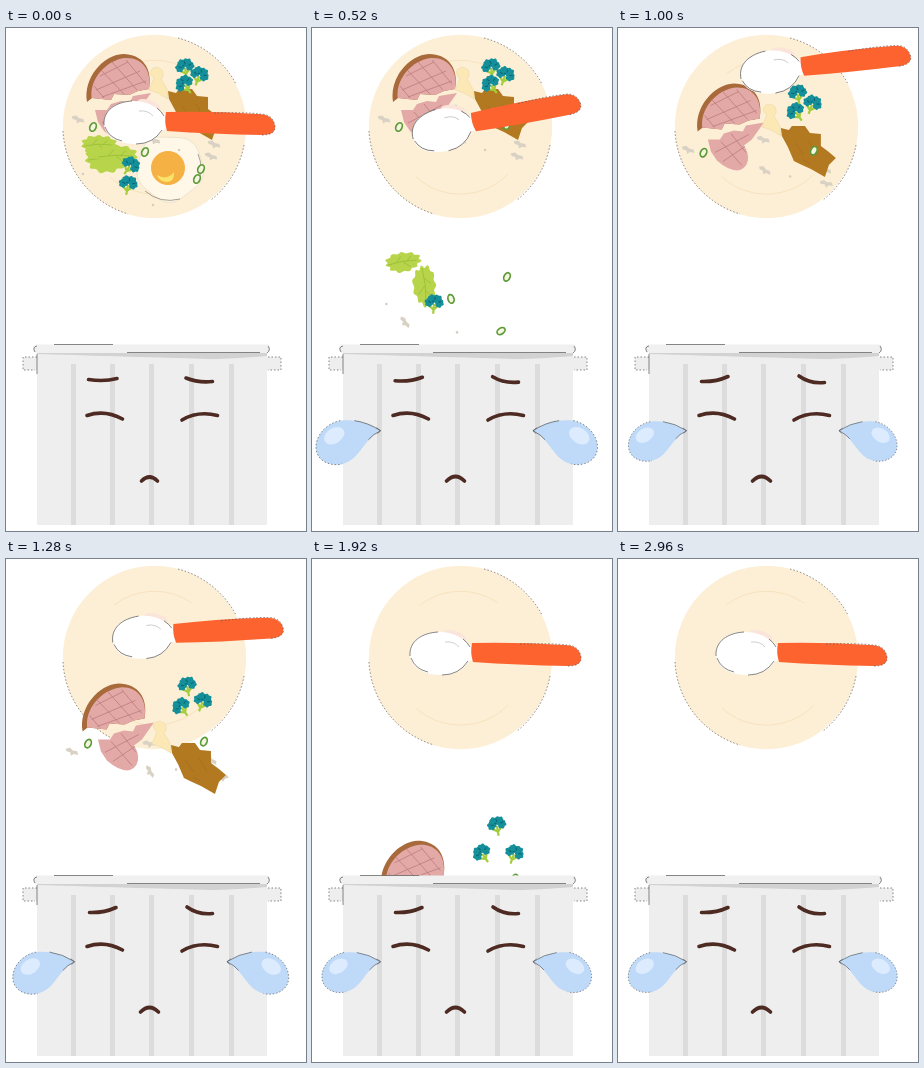
Write an HTML page that moves like this. It is 300x503 px and loops after 3 s.

```html
<!DOCTYPE html>
<html lang="en">
<head>
<meta charset="utf-8">
<title>Sad bin</title>
<style>
html, body { margin: 0; width: 100%; height: 100%; overflow: hidden; background: #fff; }
svg { display: block; width: 300px; height: 503px; }
.ink { fill: none; stroke: #555; stroke-width: .7; }
.dots { stroke-dasharray: 1.5 2; }
.face { fill: none; stroke: #4d2a22; stroke-width: 3.6; stroke-linecap: round; }
</style>
</head>
<body>
<svg viewBox="0 0 300 503">
  <defs>
    <clipPath id="above"><path d="M0 0H300V318H0Z"/></clipPath>
    <g id="tear">
      <path fill="#bedaf8" d="M0 0C-10-7-24-12-40-10C-55-7-65 6-64 18C-63 30-50 36-38 33C-20 29-17 8 0 0Z"/>
      <ellipse cx="-46" cy="5" rx="11" ry="7.5" fill="#dcebfd" transform="rotate(-32 -46 5)"/>
      <path class="ink" d="M-26-10Q-12-8 0 0Q-8 4-12 9M-4-3L0 0L-3 3"/>
      <path class="ink dots" d="M-40-10C-55-7-65 6-64 18C-63 30-50 36-38 33"/>
    </g>
  </defs>

  <circle cx="148.5" cy="98.5" r="91.7" fill="#fdefd6"/>
  <path class="ink dots" d="M57 103A91.7 91.7 0 0 0 122 186M172 10A91.7 91.7 0 0 1 230 56M238 117A91.7 91.7 0 0 1 205 172"/>
  <path fill="none" stroke="#f8e2bd" d="M108 46A66 66 0 0 1 186 44M104 149A66 66 0 0 0 196 146"/>

  <g id="food" clip-path="url(#above)"></g>

  <g id="spoon">
    <ellipse cx="143" cy="77" rx="12" ry="5" fill="#fbe4da" transform="rotate(18 143 77)"/>
    <path fill="#fff" d="M98 95C98 80 112 73 127 73C143 73 151 80 158 86L161 87V101L157 102C151 110 144 116 130 116C113 116 98 109 98 95Z"/>
    <path class="ink" d="M98 97C97 82 110 74 126 73M99 99Q103 110 116 113M130 116Q147 116 156 102M151 80Q156 84 158 88"/>
    <path fill="none" stroke="#bbb" stroke-width=".7" d="M133 83Q142 82 147 88"/>
    <path fill="#fd632f" d="M160 84Q206 83 252 86Q267 86 269 98Q270 107 256 107Q205 106 161 103Q158 94 160 84Z"/>
    <path class="ink dots" d="M208 85Q240 84 254 86Q267 86 269 98Q270 107 256 107"/>
  </g>

  <g id="bin">
    <path fill="#eee" d="M31 325H261V497H31ZM17 329H31V342H17ZM261 329H275V342H261Z"/>
    <path fill="#dcdcdc" d="M65 336h5v161h-5zM104 336h5v161h-5zM143 336h5v161h-5zM183 336h5v161h-5zM223 336h5v161h-5z"/>
    <path fill="#d2d2d2" d="M31 325H261V328Q225 331 205 331Q100 328 31 326Z"/>
    <rect x="27" y="316.500" width="237" height="8.500" rx="4" fill="#f0f0f0"/>
    <path class="ink" d="M107 316.500H48M31 318Q26 319 29 324M31 326V346M121 324.500H254M262 318Q265 322 261 325"/>
    <path class="ink dots" d="M31 329H17V342H29M262 329H275V342H262"/>
  </g>

  <path class="face" d="M81 387.500Q99 381.500 116.500 391M176 392Q192 382.500 211.500 387.500"/>
  <path class="face" id="brows"/>
  <path class="face" id="mouth"/>
  <use href="#tear" id="tearL"/>
  <use href="#tear" id="tearR"/>
</svg>
<script>
const LOOP = 3000, STEP = 40;
const $ = id => document.getElementById(id);
const clamp = v => Math.max(0, Math.min(1, v));
const ease = u => (1 - Math.cos(Math.PI * clamp(u))) / 2;
const mix = (a, b, u) => a + (b - a) * u;
const path = (d, fill, extra = '') => `<path d="${d}" fill="${fill}" ${extra}/>`;
const line = (d, color, width = 1) => path(d, 'none', `stroke="${color}" stroke-width="${width}"`);

// Closed wavy outline around the origin
function blob(rx, ry, lobes, amp) {
  let d = '';
  for (let i = 0; i < 72; i++) {
    const a = i * Math.PI / 36, r = 1 + amp * Math.sin(lobes * a) + amp * .5 * Math.cos(3 * a + 1);
    d += (i ? 'L' : 'M') + (rx * r * Math.cos(a)).toFixed(1) + ' ' + (ry * r * Math.sin(a)).toFixed(1);
  }
  return d + 'Z';
}

const broccoli = tilt => `<g transform="rotate(${tilt})">` +
  line('M0 0L0 10M0 6L5 1M0 6L-5 2', '#a5cc3c', 2.2) +
  [[-5, -1], [5, -1], [-2, -5], [3, -5]].map(([x, y]) =>
    path(blob(4.4, 4.2, 6, .1), '#15909a', `transform="translate(${x} ${y})"`)).join('') +
  line('M-6 -2l3 1M0 -7l1 3M4 -2l3 -1M-2 -2l2 -1', '#0b6577', 1.1) + '</g>';
const lettuce = (rx, ry) =>
  path(blob(rx, ry, 11, .09), '#b7d44a') +
  line(`M${-rx * .9} 1Q0 -2 ${rx * .8} 0M${-rx * .4} 0L${-rx * .1} ${-ry * .6}M0 0L${rx * .4} ${ry * .6}M${rx * .2} 0L${rx * .5} ${-ry * .5}`, '#9cc03c', .9);
const ring = '<ellipse rx="3" ry="4.400" transform="rotate(25)" fill="#f5f6df" stroke="#5d9a38" stroke-width="1.700"/>';
const scrap = path('M-7 -3L-2 -4L1 -1L6 0L7 4L2 3L-1 5L-2 1L-6 0Z', '#d9d2c4', 'transform="scale(.9)"');
const crumb = '<circle r="1.300" fill="#d5cec0"/>';
const egg =
  path(blob(33, 32.5, 5, .04), '#fff8e9', 'stroke="#e7dfc9" stroke-width=".8"') +
  '<circle cx="-2" r="17" fill="#f6b145"/>' +
  path('M-13 7Q-3 13 4 4Q5 14 -4 14Q-11 13 -13 7Z', '#fbe36a') +
  line('M-25 23Q-10 36 10 31M28 -14Q34 0 28 14', '#6b6b5c', .6);
const hamCut = 'L132 63L123 67L108 66L105 72L86 70Z';
const hamTop =
  path('M81 74C77 50 97 27 117 26C136 26 147 40 143 61' + hamCut, '#a8693b') +
  path('M86 72C82 52 100 32 119 30C136 29 146 42 143 61' + hamCut, '#e2a9a7') +
  line('M95 42L118 66M106 34L131 62M120 32L140 56M88 58L98 70M90 62L134 43M96 69L140 53M94 48L122 34', '#bd7c7d', .8);
const hamBottom =
  path('M145 65L127 68L124 74L115 73L105 76L101 82L89 82L92 94L98 103Q108 112 118 113Q127 112 129 103Q130 95 125 88L133 82Z', '#e2a9a7') +
  line('M102 84L123 108M112 76L127 95M96 95L130 77M104 104L126 89', '#bd7c7d', .8);
const drumstick =
  path('M148 50Q142 45 146 41Q151 37 156 42Q159 47 155 51L161 61L162 71L152 65L143 62Z', '#fbe8b5', 'stroke="#eddcae" stroke-width=".7"') +
  path('M162 63L170 65L173 61L186 61L191 68L202 69L202 81L210 87L217 93L210 100L206 112L192 104L181 99L175 96L169 82L163 71Z', '#b27920') +
  line('M176 78l9 12M190 76l8 14M184 95l8 4', '#a87120', 1);

// art, base x, base y, drift x, drift y, turn in degrees over the first 130 px
const firstHelping = [
  [scrap, 93, 134, 0, 1.23, 30],
  [egg, 164, 140, 0, 1.7, 0],
  [lettuce(21, 13), 101, 131, 0, 1.7, 10],
  [lettuce(17, 9.5), 93, 117, -.015, .9, -8],
  [lettuce(20, 11), 110, 128, .02, 1, 85],
  [broccoli(10), 122, 157, 0, 1.5, 0],
  [broccoli(35), 124, 138, -.015, 1.06, -30],
  [ring, 195, 141, 0, .83, 0],
  [ring, 139, 124, 0, 1.13, -40],
  [ring, 191, 151, -.015, 1.17, 30],
  [crumb, 147, 177, -.015, .98, 0],
  [crumb, 77, 146, -.02, 1, 0]
];
const secondHelping = [
  [scrap, 72, 91, -.062, 1.03, 0],
  [scrap, 146, 80, -.03, 1.06, -20],
  [scrap, 205, 128, .11, .92, -40],
  [scrap, 208, 116, -.03, .86, 20],
  [crumb, 173, 122, -.03, .9, 0],
  [scrap, 148, 112, -.04, 1.02, 50],
  [hamTop, 0, 0, -.045, 1, 0],
  [hamBottom, 0, 0, .03, 1, 0],
  [drumstick, 0, 0, .03, 1.25, 0],
  [broccoli(-10), 179, 40, .023, .887, 0],
  [broccoli(20), 193, 48, .035, .966, 0],
  [broccoli(-35), 179, 57, -.034, .93, 0],
  [ring, 87, 99, -.05, .87, 0],
  [ring, 195, 97, .03, .87, 0]
];

function serve(items) {
  return items.map(([art, ...motion]) => {
    const node = document.createElementNS('http://www.w3.org/2000/svg', 'g');
    node.innerHTML = art;
    $('food').append(node);
    return { node, motion };
  });
}
function drop(items, fall) {
  for (const { node, motion: [x, y, dx, dy, turn] } of items)
    node.setAttribute('transform', `translate(${x + dx * fall} ${y + dy * fall}) rotate(${turn * Math.min(1, fall / 130)})`);
}
const first = serve(firstHelping), second = serve(secondHelping);

// time, x, y, angle
const spoonKeys = [[0, 0, 0, 0], [500, 1, 1, -12.5], [1010, 24, -55, -8], [1460, 0, 0, 0], [LOOP, 0, 0, 0]];
function spoonPose(t) {
  const i = spoonKeys.findIndex((k, n) => n && t <= k[0]);
  const a = spoonKeys[i - 1], b = spoonKeys[i];
  const u = (t - a[0]) / (b[0] - a[0]);
  return [mix(a[1], b[1], ease(u)), mix(a[2], b[2], ease(u)), mix(a[3], b[3], u * u)];
}

function secondFall(t) {
  const s = Math.max(0, t - 780);
  return .246 * (s < 200 ? s * s / 400 : s - 100);
}

function draw(t) {
  drop(first, .25 * t);
  drop(second, secondFall(t));

  const [x, y, angle] = spoonPose(t);
  $('spoon').setAttribute('transform', `translate(${x} ${y}) rotate(${angle} 160 94)`);

  const sway = (61.2 + 3.2 * Math.cos((t - 510) * Math.PI / 500)) / 64;
  const size = t < 510 ? ease(t / 510) * 64.4 / 64 : sway;
  $('tearL').setAttribute('transform', `translate(68.5 402.7) scale(${size})`);
  $('tearR').setAttribute('transform', `translate(221 402.7) scale(${-size} ${size})`);

  const b = ease(t / 900), m = ease(t / 500);
  $('brows').setAttribute('d',
    `M${82.5 + b} ${351.5 + 2 * b}Q98 354 ${111 - b} ${350.5 - 2 * b}` +
    `M${180 + b} ${350 - 2 * b}Q192 ${355 + b} 206.500 ${353.5 + b}`);
  $('mouth').setAttribute('d', `M${135.5 - m} 453Q143.5 ${445 - m} ${151.5 + m} 453`);
}

const start = performance.now();
function tick() {
  const t = (performance.now() - start) % LOOP;
  draw(Math.floor(t / STEP) * STEP);
  requestAnimationFrame(tick);
}
draw(0);
tick();
</script>
</body>
</html>
```
